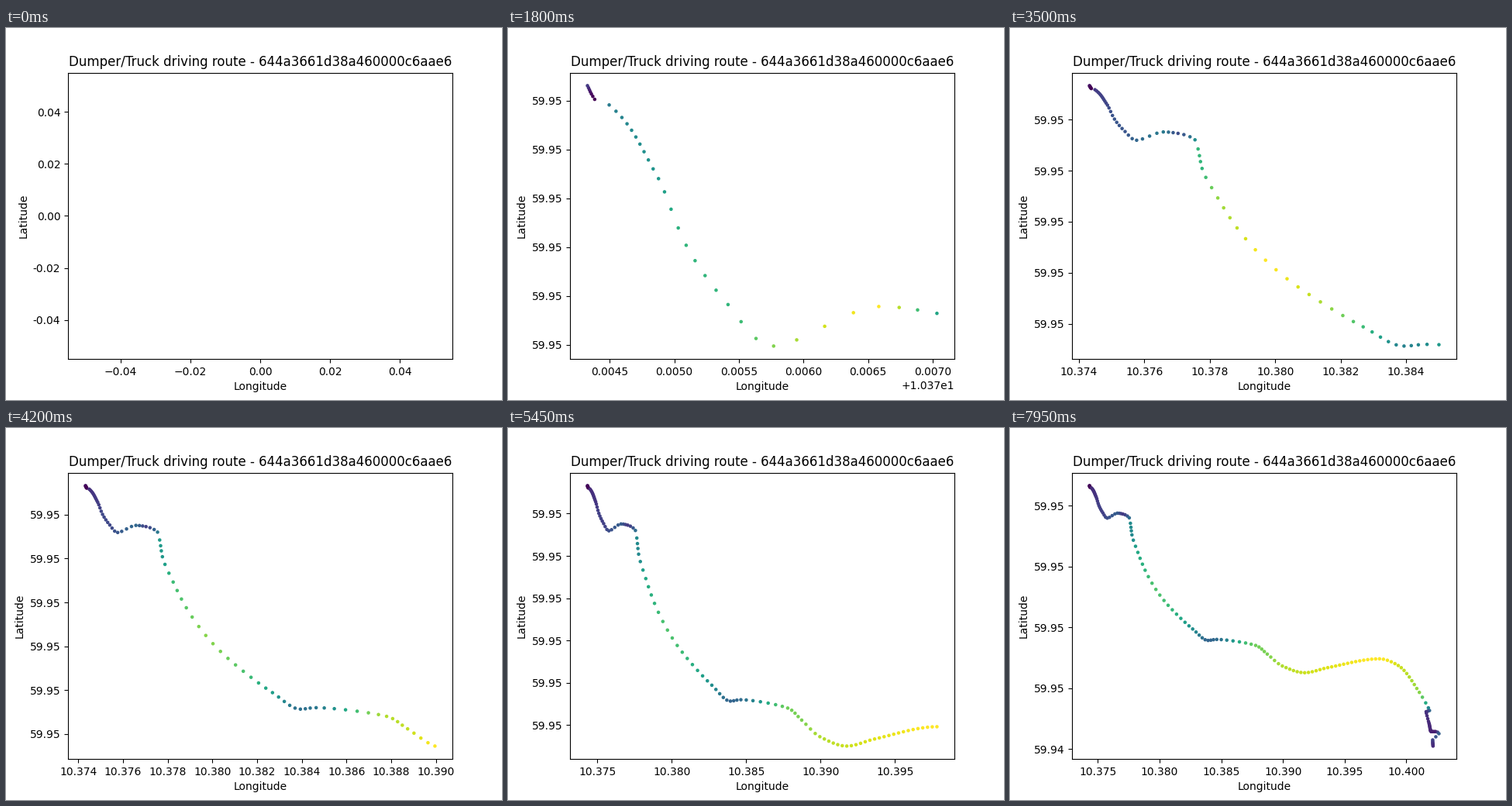
Animation of 640 by 480 pixels, one loop 8 s. Source, as a matplotlib script:

```python
import numpy as np
import matplotlib.pyplot as plt
from matplotlib.animation import FuncAnimation
from matplotlib.ticker import FormatStrFormatter

FRAMES = 160
LON0, LAT0, UNIT = 10.374, 59.944, 1e-5

# Key points of the drive: fix number, east, north (in UNIT degrees), speed
KEYS = np.array([
    (0, 32.8, 866.1, .05), (6, 38.4, 860.5, 0), (7, 49.6, 858.2, .12),
    (17, 87.8, 828, .155), (21, 109.2, 800.7, .19), (25, 141.6, 776.4, .19),
    (28, 176.9, 759.4, .235), (32, 258.3, 775.6, .29), (35, 303.3, 772.8, .17),
    (38, 355.1, 760.2, .35), (39, 364.5, 742.3, .48), (42, 376.7, 704.2, .47),
    (45, 424.8, 646.5, .6), (48, 483.6, 587.9, .65), (51, 570.6, 524.8, .72),
    (54, 669.9, 472.5, .68), (60, 868.8, 394.5, .49), (65, 993.6, 356.9, .32),
    (68, 1063.9, 360.2, .35), (75, 1379, 340.5, .78), (79, 1473, 312, .8),
    (83, 1595, 272.8, .88), (89, 1776, 250.7, .92), (95, 1963, 267.4, .95),
    (108, 2382, 296.4, 1), (113, 2534, 274.4, .93), (121, 2705, 186, .82),
    (125, 2787, 126.3, .33), (127, 2760, 122.5, .15), (132, 2783, 85, .12),
    (144, 2803, 57, .1), (148, 2837, 57, .08), (150, 2863.5, 50.2, .3),
    (152, 2813, 29.6, .2), (158, 2815.7, 9.4, .12),
])


def smooth(t, knots, values):
    """Cubic curve through the knots that never overshoots them."""
    h = np.diff(knots)
    d = np.diff(values) / h
    a, b = d[:-1], d[1:]
    same = a * b > 0
    inner = np.where(same, 2 * a * b / np.where(same, a + b, 1), 0)
    slope = np.concatenate([d[:1], inner, d[-1:]])

    i = np.clip(np.searchsorted(knots, t, side="right") - 1, 0, len(h) - 1)
    s = (t - knots[i]) / h[i]
    return ((1 + 2 * s) * (1 - s) ** 2 * values[i]
            + s * (1 - s) ** 2 * h[i] * slope[i]
            + s * s * (3 - 2 * s) * values[i + 1]
            + s * s * (s - 1) * h[i] * slope[i + 1])


fix = np.arange(FRAMES - 1)
east, north, speed = (smooth(fix, KEYS[:, 0], KEYS[:, c]) for c in (1, 2, 3))
lon = LON0 + east * UNIT
lat = LAT0 + north * UNIT

fig, ax = plt.subplots(figsize=(6.4, 4.8), dpi=100)


def draw(n):
    ax.clear()
    ax.scatter(lon[:n], lat[:n], c=speed[:n], s=5, cmap="viridis")
    ax.set_title("Dumper/Truck driving route - 644a3661d38a460000c6aae6")
    ax.set_xlabel("Longitude")
    ax.set_ylabel("Latitude")
    ax.yaxis.set_major_formatter(FormatStrFormatter("%.2f"))


anim = FuncAnimation(fig, draw, frames=FRAMES, init_func=lambda: draw(0),
                     interval=50, repeat=True, repeat_delay=0)
plt.show()
```
